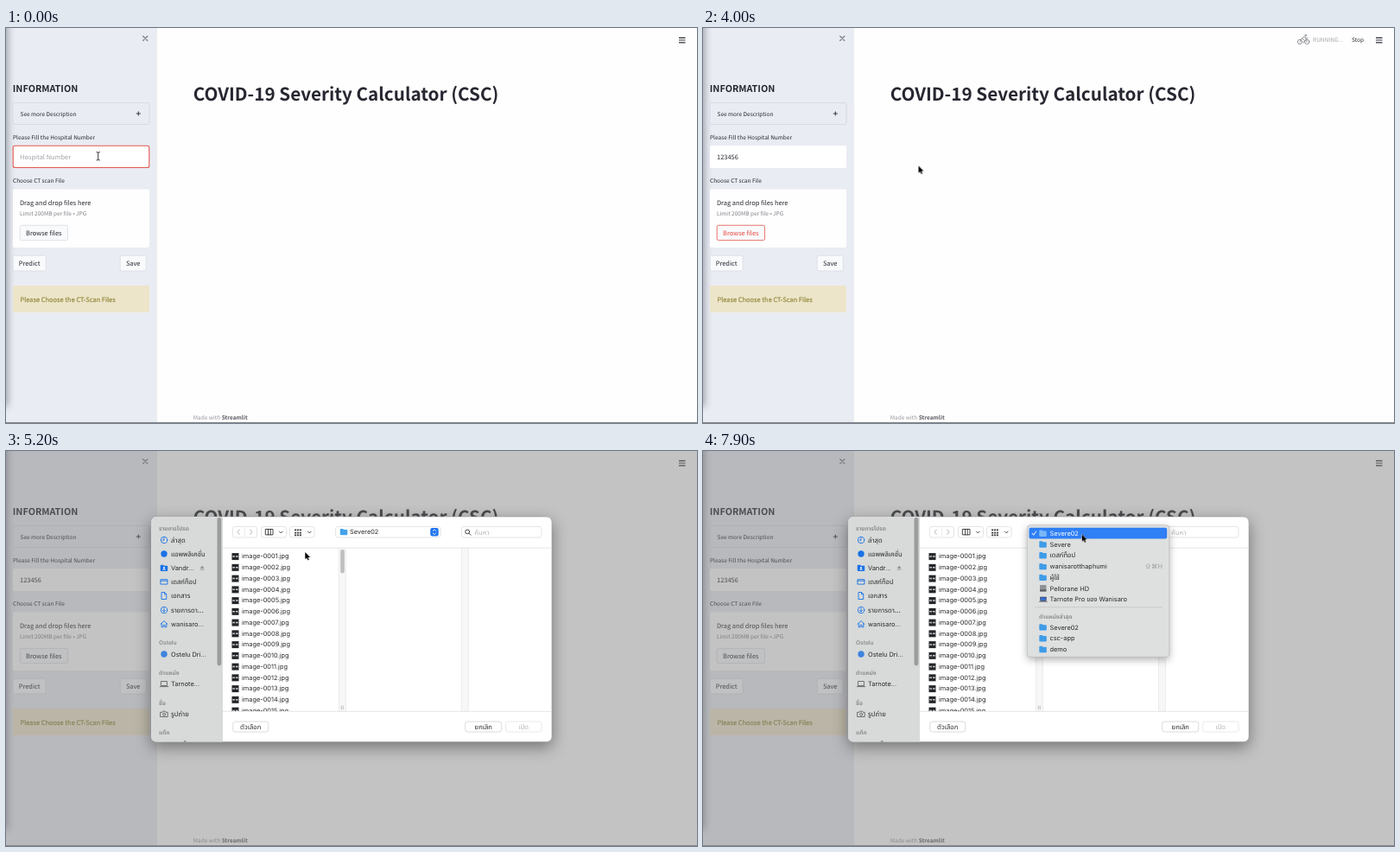
An HTML page that plays this animation: 800 px wide and 457 px high, repeating every 8 s.

```html
<!DOCTYPE html>
<html lang="en">
<head>
<meta charset="utf-8">
<title>Severity Calculator</title>
<style>
html, body { margin: 0; width: 100%; height: 100%; overflow: hidden; background: #fefefe; }
svg { display: block; width: 800px; height: 457px; }
text { text-rendering: geometricPrecision; fill: #262730; white-space: pre; }
.page text { font: 6.52px "Noto Sans CJK JP", "Noto Sans CJK SC", "Noto Sans CJK", Lato, sans-serif; }
.page text.b { font-size: 7.45px; }
.page .dim { fill: #7f8087; }
.mid { text-anchor: middle; }
.btn { fill: #f9fafc; stroke: #dadce2; stroke-width: .8; }
.sheet text { font: 7.4px Inter, "Noto Sans Thai", "Noto Sans", "DejaVu Sans", sans-serif; fill: #2b2b2b; }
.sheet text.th { font-size: 7.7px; font-weight: 500; }
.sheet text.hd { font-size: 6.6px; font-weight: 600; fill: #8b8d8d; }
.sheet text.off { fill: #b4b4b4; }
.ctl { fill: #fff; stroke: #dedede; stroke-width: .8; }
.ln { fill: none; stroke-linecap: round; stroke-linejoin: round; }
.blue { stroke: #1a72e6; stroke-width: .9; }
.gray { stroke: #555; stroke-width: .8; }
.dark { stroke: #333; stroke-width: .9; }

/* one loop: 8 s, 1.25% = 100 ms */
.a { animation: 8s step-end infinite; }
.hint { animation-name: hint; }
.caret { animation-name: caret; }
.typing { animation-name: typing; }
.focus { animation-name: focus; }
.run { animation-name: run; }
.hot { animation-name: hot; }
.veil { animation-name: veil; }
.sheet { animation-name: sheet; }
.list { animation-name: list; }
.thumb { animation-name: thumb; }
.pop { animation-name: pop; }
.ibeam { animation-name: hint; }
.move { animation-name: move; }
.arrow { animation-name: arrow; }
.resize { animation-name: resize; }
.bike { animation: blink .2s step-end infinite; }
.jog { animation: blink .2s -.1s step-end infinite; }

@keyframes blink { 0% { opacity: 1 } 50%, 100% { opacity: 0 } }
@keyframes hint { 0% { opacity: 1 } 10%, 100% { opacity: 0 } }
@keyframes typing { 0% { opacity: 0 } 10% { opacity: 1 } 33.75%, 100% { opacity: 0 } }
@keyframes caret {
  0% { transform: translateX(0) }
  10% { transform: translateX(4.13px) }
  12.5% { transform: translateX(8.26px) }
  16.25% { transform: translateX(12.39px) }
  20% { transform: translateX(16.52px) }
  23.75% { transform: translateX(20.65px) }
  27.5%, 100% { transform: translateX(24.9px) }
}
@keyframes focus { 0% { opacity: 1 } 43.75%, 100% { opacity: 0 } }
@keyframes run { 0% { opacity: 0 } 35% { opacity: 1 } 57.5%, 100% { opacity: 0 } }
@keyframes hot { 0% { opacity: 0 } 41.25% { opacity: 1 } 57.5%, 100% { opacity: 0 } }
@keyframes veil {
  0% { opacity: 0 }
  51.25% { opacity: .35; animation-timing-function: steps(3) }
  55%, 100% { opacity: .45 }
}
@keyframes sheet {
  0% { opacity: 0; transform: translateY(-4.5px) }
  51.25% { opacity: 1; transform: translateY(-4.5px); animation-timing-function: steps(2) }
  53.75%, 100% { opacity: 1; transform: translateY(0) }
}
@keyframes list {
  0% { transform: translateY(0) }
  75% { transform: translateY(0); animation-timing-function: steps(6) }
  82.5% { transform: translateY(-17.2px) }
  83.75% { transform: translateY(-17.2px); animation-timing-function: steps(4) }
  88.75%, 100% { transform: translateY(0) }
}
@keyframes thumb {
  0% { transform: translateY(0) }
  75% { transform: translateY(0); animation-timing-function: steps(6) }
  82.5% { transform: translateY(2.3px) }
  83.75% { transform: translateY(2.3px); animation-timing-function: steps(4) }
  88.75%, 100% { transform: translateY(0) }
}
@keyframes pop { 0% { opacity: 0 } 93.75%, 100% { opacity: 1 } }
@keyframes move {
  0% { transform: translate(107px, 148px) }
  32.5% { transform: translate(107px, 148px); animation-timing-function: steps(8) }
  42.5% { transform: translate(44px, 236px) }
  43.75% { transform: translate(44px, 236px); animation-timing-function: steps(5) }
  50% { transform: translate(249.5px, 159.5px) }
  55% { transform: translate(249.5px, 159.5px); animation-timing-function: steps(8) }
  65% { transform: translate(346.3px, 117px) }
  66.25% { transform: translate(346.3px, 117px); animation-timing-function: steps(4) }
  71.25% { transform: translate(213px, 214px); animation-timing-function: steps(2) }
  73.75% { transform: translate(280px, 165px) }
  87.5% { transform: translate(280px, 165px); animation-timing-function: steps(3) }
  91.25%, 100% { transform: translate(438.7px, 96.5px) }
}
@keyframes arrow { 0% { opacity: 0 } 33.75% { opacity: 1 } 51.25% { opacity: 0 } 55%, 100% { opacity: 1 } }
@keyframes resize { 0% { opacity: 0 } 51.25% { opacity: 1 } 55%, 100% { opacity: 0 } }
</style>
</head>
<body>
<svg viewBox="0 0 800 457">
<defs>
  <clipPath id="frame"><rect x="168" y="76" width="464" height="260.500" rx="6"/></clipPath>
  <clipPath id="column"><rect x="251" y="112.500" width="134" height="188.500"/></clipPath>
  <path id="folder" d="M0 1q0-1 1-1h2.300l1 1H7.500q1 0 1 1v4.300q0 1-1 1H1q-1 0-1-1z"/>
  <path id="down" class="ln" d="M-1.800-.9 0 .9 1.800-.9"/>
</defs>

<g class="page">
  <rect width="800" height="457" fill="#fefefe"/>
  <rect width="175" height="457" fill="#eaecf3"/>
  <rect x="-14" y="-14" width="16" height="452" fill="#3c4150" opacity=".45" style="filter:blur(4px)"/>

  <path class="ln" d="m158.700 9.500 5 5m0-5-5 5" stroke="#80838c" stroke-width="1.400"/>
  <path d="M779 11.300h7.500M779 14h7.500M779 16.800h7.500" stroke="#2f3038" stroke-width="1.200"/>

  <text x="7.800" y="73.500" style="font-size:10.8px;font-weight:700">INFORMATION</text>
  <rect x="8" y="86.500" width="158" height="25" rx="2" fill="#e9ecf3" stroke="#d6d9e2" stroke-width=".9"/>
  <text x="16.500" y="101.500">See more Description</text>
  <path d="M150.800 99h5m-2.500-2.500v5" stroke="#262730" stroke-width=".9"/>

  <text x="8" y="128.700">Please Fill the Hospital Number</text>
  <rect x="8" y="136" width="158" height="26" rx="2" fill="#fff"/>
  <text class="b" x="16" y="151.800">123456</text>
  <g class="a caret">
    <rect x="16" y="142" width="32" height="14" fill="#fff"/>
    <rect class="a typing" x="16.200" y="143.500" width=".8" height="10.500" fill="#262730"/>
  </g>
  <text class="b a hint" x="16" y="151.800" style="fill:#a0a1a8">Hospital Number</text>
  <text class="dim a typing" x="163" y="158.500" text-anchor="end">Press Enter to apply</text>
  <rect class="a focus" x="8.200" y="136.300" width="157.600" height="25.200" rx="2" fill="none" stroke="#e2574f" stroke-width="1.100"/>

  <text x="8" y="179">Choose CT scan File</text>
  <rect x="8" y="186.500" width="158" height="67.500" rx="2" fill="#fefefe"/>
  <text class="b" x="16" y="204.500">Drag and drop files here</text>
  <text class="dim" x="16" y="217">Limit 200MB per file • JPG</text>
  <rect class="btn" x="16.200" y="228.300" width="55.300" height="17.300" rx="2"/>
  <text class="b mid" x="43.800" y="240">Browse files</text>
  <g class="a hot">
    <rect x="16.200" y="228.300" width="55.300" height="17.300" rx="2" fill="#f9fafc" stroke="#ee6a64" stroke-width=".9"/>
    <text class="b mid" x="43.800" y="240" style="fill:#e8483f">Browse files</text>
  </g>
  <rect class="btn" x="8.200" y="263.300" width="38" height="17.700" rx="2"/>
  <text class="b mid" x="27.100" y="275">Predict</text>
  <rect class="btn" x="132.200" y="263.300" width="30" height="17.700" rx="2"/>
  <text class="b mid" x="147.200" y="275">Save</text>
  <rect x="8" y="298" width="158" height="31" rx="2" fill="#ede5c9"/>
  <text class="b" x="16.500" y="316.500" style="fill:#958b42;stroke:#958b42;stroke-width:.2">Please Choose the CT-Scan Files</text>

  <text x="216.700" y="84" style="font-size:20.7px;font-weight:700">COVID-19 Severity Calculator (CSC)</text>
  <text x="216.700" y="452.500" style="fill:#96979d">Made with <tspan font-weight="700" fill="#5c5d65">Streamlit</tspan></text>

  <g class="a run">
    <g class="bike ln" stroke="#85868d" stroke-width=".9">
      <circle cx="691" cy="16" r="2.600"/><circle cx="699.300" cy="16" r="2.600"/>
      <path d="m691 16 2.500-4 3.200 2.500-1.500 2.500M693.500 12l3-2.200 1.700 2h2M697.500 11.500l1.800 4.500"/>
      <circle cx="697.800" cy="8.400" r=".9"/>
    </g>
    <g class="jog ln" stroke="#85868d" stroke-width="1">
      <circle cx="696" cy="9" r=".9"/>
      <path d="m691 12.200 1.800-1.700 2.500.3-1.300 3.700 2.300 1.300v3M694 14.500l-1 2.500-3 .3M695.300 11l1.300 1.700 2-.2"/>
    </g>
    <text x="706" y="16.300" style="fill:#a3a4ab">RUNNING...</text>
    <text x="751" y="16.400">Stop</text>
  </g>
  <rect class="a veil" width="800" height="456" fill="#7a7a7a"/>
  <rect y="456" width="800" height="1" fill="#87888b"/>
</g>

<g class="a sheet">
  <rect x="168" y="76" width="464" height="260.500" rx="6" fill="#fff" stroke="#999" stroke-width=".6" style="filter:drop-shadow(0 6px 9px rgba(0,0,0,.4))"/>
  <g clip-path="url(#frame)">
    <rect x="168" y="76" width="83" height="261" fill="#d7dad9"/>
    <rect x="244.500" y="77" width="4.800" height="171.500" rx="2.400" fill="#9b9d9d"/>
    <g id="side"></g>
    <g class="ln blue">
      <circle cx="183" cy="103" r="3.700"/><path d="M183 100.700V103.200h-1.700"/>
      <path d="M179.300 148.700h7.600v5.400h-7.600zM179.300 150.200h7.600"/>
      <path d="M180.400 163.500h3.300l2 2v6h-5.300zM183.500 163.700v2h2"/>
      <circle cx="183" cy="184" r="3.700"/><path d="M183 181.800v4m-1.500-1.400 1.500 1.500 1.500-1.500"/>
      <path d="m179 200.300 4-3.700 4 3.700M180.200 199.500v4.300h1.900v-2.500h1.800v2.500h1.900v-4.300"/>
    </g>
    <circle cx="183" cy="119" r="3.700" fill="#1a72e6"/>
    <use href="#folder" x="178.700" y="131.800" fill="#1a72e6"/>
    <path d="M181 137.500q2-2.500 4 0" fill="#fff"/><circle cx="183" cy="135" r="1" fill="#fff"/>
    <circle cx="183" cy="235" r="3.700" fill="#3f83dd"/>
    <path d="m224.600 135.800 2.500-3 2.500 3zM224.600 136.700h5v.9h-5z" fill="#8b8d8d"/>
    <g class="ln gray">
      <path d="M179.800 266.500h6.600v5h-6.600zM178.300 272.600h9.500"/>
      <path d="M179 302.300h2l.8-1.200h2.600l.8 1.200h2v5.200H179z"/><circle cx="183.100" cy="304.700" r="1.500"/>
    </g>
  </g>

  <rect class="ctl" x="262.500" y="87.500" width="28" height="12.500" rx="2.500"/>
  <path d="M276.500 88.500v10.500" stroke="#e2e2e2" stroke-width=".7"/>
  <path class="ln" d="m270.300 91-2.300 2.700 2.300 2.700M282.700 91l2.300 2.700-2.300 2.700" stroke="#ababab" stroke-width=".9"/>
  <rect class="ctl" x="295.500" y="87.500" width="29" height="12.500" rx="2.500"/>
  <path class="ln dark" d="M300.700 90.500h8.300v6.400h-8.300zM303.500 90.500v6.400M306.200 90.500v6.400"/>
  <use href="#down" x="318.300" y="94" class="dark"/>
  <rect class="ctl" x="328.500" y="87.500" width="28.500" height="12.500" rx="2.500"/>
  <path d="M334 91.300h8M334 94.700h8M334 97.300h8" stroke="#444" stroke-width="1.700" stroke-dasharray="2.200 .7"/>
  <use href="#down" x="351.300" y="94" class="dark"/>
  <rect class="ctl" x="381.500" y="87.500" width="121.500" height="12.500" rx="2.500"/>
  <use href="#folder" x="386.800" y="90" fill="#45a2ea"/>
  <text x="398" y="96.300">Severe02</text>
  <rect x="491.300" y="89" width="9.400" height="9.400" rx="2" fill="#1f75ee"/>
  <path class="ln" d="m494.300 92.500 1.700-1.700 1.700 1.700M494.300 95l1.700 1.700 1.700-1.700" stroke="#fff" stroke-width=".9"/>
  <rect class="ctl" x="527.300" y="87.500" width="92.700" height="12.500" rx="2.500"/>
  <path class="ln dark" d="m536 95.300 2 2"/><circle class="ln dark" cx="534.200" cy="93.400" r="2.400"/>
  <text class="th off" x="542.300" y="96.700">ค้นหา</text>

  <path d="M251 112.200h381M251 301.300h381" stroke="#dfdfdf" stroke-width=".8"/>
  <g clip-path="url(#column)"><g id="rows" class="a list"></g></g>
  <path d="M385.400 112.500h8v188.500h-8zM527.400 112.500h8v188.500h-8z" fill="#f7f7f7" stroke="#e6e6e6" stroke-width=".7"/>
  <rect class="a thumb" x="387.200" y="114" width="4.700" height="27.500" rx="2.300" fill="#c0c0c0"/>
  <path d="M388.300 294.500v4.500M390.300 294.500v4.500" stroke="#aaa" stroke-width=".7"/>

  <g fill="#fff" stroke="#d2d2d2" stroke-width=".8">
    <rect x="262.800" y="313" width="41" height="12" rx="2.700"/>
    <rect x="531.700" y="313" width="42" height="12" rx="2.700"/>
    <rect x="578.600" y="313" width="41.500" height="12" rx="2.700" stroke="#e4e4e4"/>
  </g>
  <text class="th mid" x="283.200" y="321.800">ตัวเลือก</text>
  <text class="th mid" x="552.800" y="321.800">ยกเลิก</text>
  <text class="th mid off" x="599.300" y="321.800">เปิด</text>

  <g class="a pop">
    <rect x="375.300" y="85.800" width="164.500" height="152.500" rx="3.500" fill="#dedfdf" stroke="#b5b5b5" stroke-width=".6" style="filter:drop-shadow(0 3px 4px rgba(0,0,0,.3))"/>
    <rect x="377.500" y="88.800" width="159.700" height="12.800" rx="2" fill="#2f7ff5"/>
    <path class="ln" d="m381.200 95.300 1.600 2 2.800-4.300" stroke="#fff" stroke-width="1"/>
    <path d="M384 180.700h148" stroke="#c4c5c5" stroke-width=".8"/>
    <g id="menu"></g>
    <text class="hd" x="389" y="193.500">ตำแหน่งล่าสุด</text>
    <text class="off" x="532" y="136" text-anchor="end" style="fill:#9a9a9a">⇧⌘H</text>
    <rect x="390" y="155" width="7.500" height="7.500" rx="1" fill="#8f9296"/>
    <rect x="390" y="160.300" width="7.500" height="2.200" fill="#5d6064"/>
    <rect x="390.300" y="168.700" width="7.200" height="5" rx=".6" fill="#23324f"/>
    <rect x="391" y="169.400" width="5.800" height="3.500" fill="#3a6fd0"/>
    <rect x="389" y="173.700" width="9.800" height="1" fill="#777"/>
  </g>
</g>

<g class="a ibeam">
  <path class="ln" d="M105 143.500q1.700 0 1.700 1 0-1 1.700-1M106.700 144.500v7.500M105 153q1.700 0 1.700-1 0 1 1.700 1" stroke="#222" stroke-width=".9"/>
</g>
<g class="a move">
  <path class="a arrow" d="M0 0V8.200L1.900 6.500 3.200 9.400 4.600 8.800 3.300 6H5.900Z" stroke="#fff" stroke-width=".9" paint-order="stroke"/>
  <path class="a resize" d="M-.2-4h1.700v3.300h1.300v-1.500L5 .3 2.800 2.600V1.200H1.500v3.600H-.2V1.200h-1.300v1.400L-3.800.3l2.300-2.500v1.500h1.300z" stroke="#fff" stroke-width=".9" paint-order="stroke"/>
</g>
</svg>

<script>
const NS = 'http://www.w3.org/2000/svg';
const thai = s => /[\u0e00-\u0e7f]/.test(s);

function add(parent, tag, attrs, label) {
  const el = document.createElementNS(NS, tag);
  for (const k in attrs) el.setAttribute(k, attrs[k]);
  if (label) el.textContent = label;
  parent.append(el);
  return el;
}

const side = document.getElementById('side');
for (const [y, s] of [[91.5, 'รายการโปรด'], [224.3, 'Ostelu'], [258.5, 'ตำแหน่ง'], [293.5, 'ชื่อ'], [328, 'แท็ก']])
  add(side, 'text', { x: 177, y, class: 'hd' }, s);
for (const [y, s] of [
  [105.7, 'ล่าสุด'], [121.7, 'แอพพลิเคชั่น'], [138, 'Vandr...'], [154.2, 'เดสก์ท็อป'], [170.3, 'เอกสาร'],
  [186.6, 'รายการดา...'], [202.6, 'wanisaro...'], [237.6, 'Ostelu Dri...'], [272.2, 'Tarnote...'],
  [307.2, 'รูปถ่าย'], [342, 'ทุกแท็ก...']
]) add(side, 'text', { x: 191, y, class: thai(s) ? 'th' : '' }, s);

const rows = document.getElementById('rows');
for (let i = 0; i < 18; i++) {
  const y = 121.8 + 12.75 * i;
  add(rows, 'rect', { x: 261.5, y: y - 3.7, width: 8, height: 8, fill: '#25272a' });
  add(rows, 'path', { d: `M262.300 ${y + .2}h2.700m1 0h2.700`, stroke: '#c9cacc', 'stroke-width': 1.7 });
  add(rows, 'text', { x: 273, y: y + 2.5 }, `image-${String(i + 1).padStart(4, '0')}.jpg`);
}

const menu = document.getElementById('menu');
const entries = ['Severe02', 'Severe', 'เดสก์ท็อป', 'wanisarotthaphumi', 'ผู้ใช้', 'Pellorane HD',
  'Tarnote Pro ของ Wanisaro', 'Severe02', 'csc-app', 'demo'];
entries.forEach((s, i) => {
  const y = 95.2 + 12.76 * i + (i > 6 ? 19.4 : 0);
  const drive = i === 5 || i === 6;
  if (!drive) add(menu, 'use', { href: '#folder', x: 389.3, y: y - 3.6, fill: i ? '#3f9ce8' : '#79b8f8' });
  const t = add(menu, 'text', { x: 401.5, y: y + 2.6, class: thai(s) && !drive ? 'th' : '' }, s);
  if (!i) t.style.fill = '#fff';
});
</script>
</body>
</html>
```
